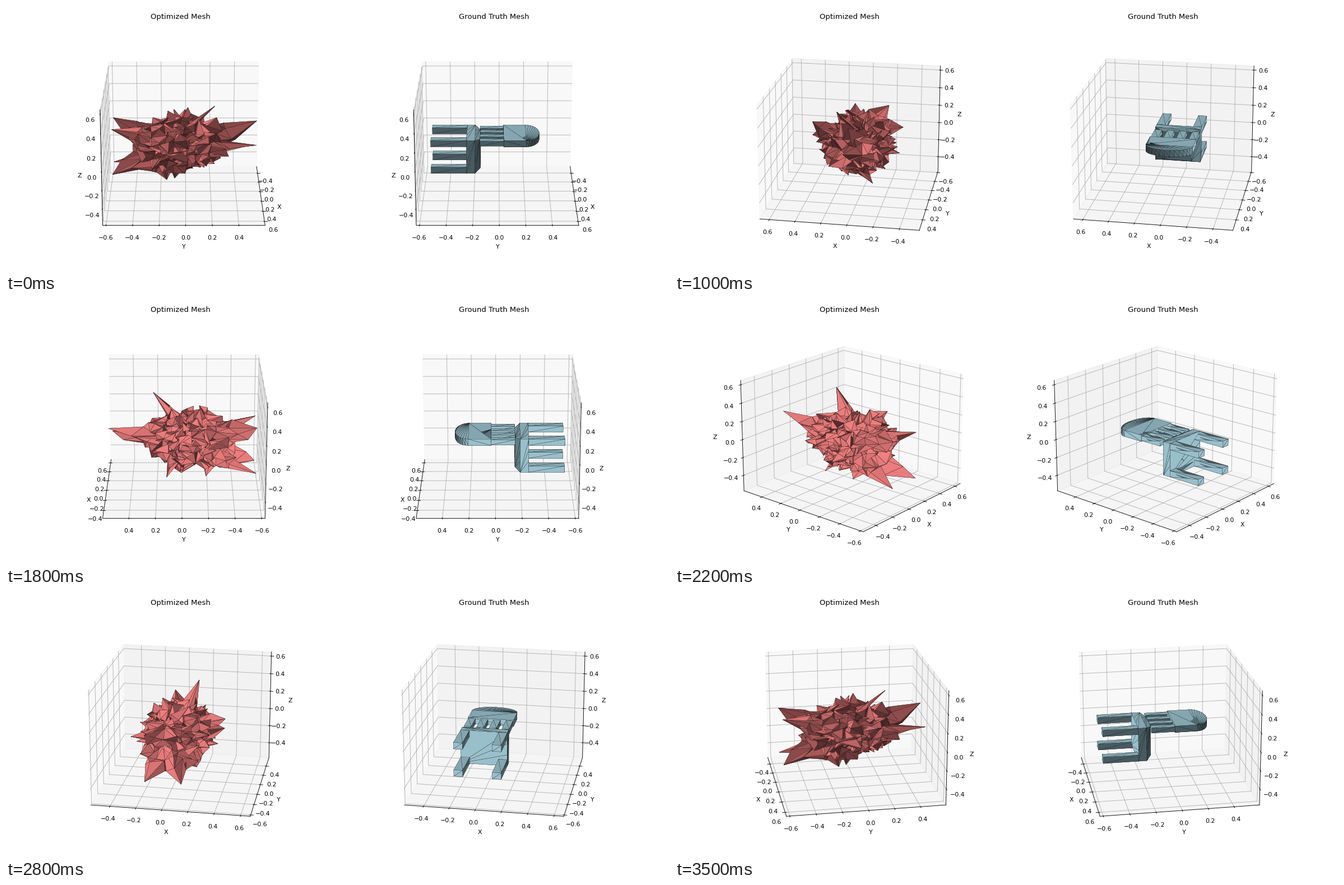
A matplotlib script that plays this animation: 1183x473 px, repeating every 3600 ms.

```python
import numpy as np
import matplotlib.pyplot as plt
from matplotlib.animation import FuncAnimation
from mpl_toolkits.mplot3d.art3d import Poly3DCollection

WIDTH, HEIGHT, DPI = 1183, 473, 78.875
FRAMES, INTERVAL = 36, 100
HALF_RANGE = 0.6115
VIEW_CENTER = (0.062, -0.014, 0.036)
BOX, BOTTOM = 432, 11.8          # square axes, in pixels


# ---- chair ---------------------------------------------------------------

def panel(a, b, c, d, n=2):
    """Quad as a fan from d, with the edge a-b cut into n - 1 parts."""
    ring = [*np.linspace(a, b, n), c]
    return [(d, p, q) for p, q in zip(ring, ring[1:])]


def cap(ring, n):
    if len(ring) == 4:
        return panel(*ring, n=n)
    return [(ring[0], p, q) for p, q in zip(ring[1:], ring[2:])]


def loft(rings, n=2):
    """Closed solid through rings that turn counterclockwise about its axis."""
    tris = cap(rings[0][::-1], n) + cap(rings[-1], n)
    for low, high in zip(rings, rings[1:]):
        for i in range(len(low)):
            j = (i + 1) % len(low)
            tris += panel(low[i], low[j], high[j], high[i], n)
    return tris


def rect(x0, x1, z0, z1, y):
    return np.array([(x0, y, z0), (x0, y, z1), (x1, y, z1), (x1, y, z0)])


def chair():
    side, z_low, z_high = 0.182, -0.275, 0.089
    leg, seat_back, seat_mid, seat_front = 0.068, -0.255, -0.19, -0.15
    rest, shoulder, rise = 0.035, 0.21, 0.105

    tris = loft([rect(-side, side, z_low, z_high, seat_back),
                 rect(-side, side, z_low, z_high, seat_mid),
                 rect(-0.115, 0.115, z_low + 0.025, z_high - 0.02, seat_front)], 4)
    for x in (-side, side - leg):
        for z in (z_low, z_high - leg):
            tris += loft([rect(x, x + leg, z, z + leg, y)
                          for y in (-0.532, seat_back)])
    for x in np.linspace(-0.15, 0.15, 4):
        tris += loft([rect(x - 0.028, x + 0.028, 0.026, 0.08, y)
                      for y in (seat_front, rest)])

    t = np.linspace(0, np.pi, 16)
    xs = np.append(side * np.cos(t), [-side, side])
    ys = np.append(shoulder + rise * np.sin(t), [rest, rest])
    tris += loft([np.column_stack([xs, ys, np.full(len(xs), z)])
                  for z in (z_high - 0.069, z_high)])
    return np.array(tris)


# ---- spiky mesh ----------------------------------------------------------

def icosphere(levels):
    g = (1 + 5 ** 0.5) / 2
    verts = [np.roll((0, a, b * g), k) for k in range(3)
             for a in (-1, 1) for b in (-1, 1)]
    verts = [v / np.linalg.norm(v) for v in verts]
    near = lambda i, j: np.dot(verts[i], verts[j]) > 0.4
    faces = []
    for i in range(12):
        for j in range(i + 1, 12):
            for k in range(j + 1, 12):
                if near(i, j) and near(j, k) and near(i, k):
                    out = np.linalg.det([verts[i], verts[j], verts[k]]) > 0
                    faces.append((i, j, k) if out else (i, k, j))
    for _ in range(levels):
        middle = {}

        def mid(i, j):
            key = min(i, j), max(i, j)
            if key not in middle:
                middle[key] = len(verts)
                m = verts[i] + verts[j]
                verts.append(m / np.linalg.norm(m))
            return middle[key]

        split = []
        for i, j, k in faces:
            a, b, c = mid(i, j), mid(j, k), mid(k, i)
            split += [(i, a, c), (a, j, b), (c, b, k), (a, b, c)]
        faces = split
    return np.array(verts), np.array(faces)


def cone_radius(angle, length, foot, spread):
    """Distance to the straight flank from a tip down to the body."""
    a = np.minimum(angle, spread)
    flank = length * foot * np.sin(spread) / (
        length * np.sin(a) + foot * np.sin(spread - a))
    return np.where(angle < spread, flank, 0)


def spiky_mesh():
    rng = np.random.default_rng(7)
    center = np.array([0.03, -0.04, -0.02])
    dirs, faces = icosphere(3)

    # Four leg tips, two backrest tips, one tall spike and one to the side.
    legs = [(x, -0.575, z) for x in (-0.14, 0.14) for z in (0.19, -0.31)]
    back = [(-0.11, 0.565, 0.17), (0.145, 0.55, 0.02)]
    spikes = [(0.145, 0.225, 0.448), (0.4, -0.09, 0.18)]
    tips = np.array(legs + back + spikes) - center
    spread = np.repeat([1.1, 0.3], [len(legs + back), len(spikes)])
    length = np.linalg.norm(tips, axis=1)
    cosine = np.clip(dirs @ (tips / length[:, None]).T, -1, 1)
    reach = cone_radius(np.arccos(cosine), length, 0.25, spread).max(axis=1)

    body = 1 / np.linalg.norm(dirs / (0.25, 0.3, 0.27), axis=1)
    radius = np.maximum(body, reach) * rng.uniform(0.72, 1.06, len(dirs))
    stray = (rng.random(len(dirs)) < 0.06) & (radius < 0.36)
    radius[stray] *= 1.3
    points = dirs * radius[:, None] + rng.normal(0, 0.032, dirs.shape)
    points[cosine.argmax(axis=0)] = tips
    return (points + center)[faces]


# ---- scene ---------------------------------------------------------------

fig = plt.figure(figsize=((WIDTH + 1e-6) / DPI, (HEIGHT + 1e-6) / DPI), dpi=DPI)


def add_view(center_x, title, tris, color):
    ax = fig.add_axes([(center_x - BOX / 2) / WIDTH, BOTTOM / HEIGHT,
                       BOX / WIDTH, BOX / HEIGHT], projection="3d")
    ax.add_collection3d(Poly3DCollection(
        tris, facecolors=color, edgecolors="black", linewidths=0.2, shade=True))
    for name, mid in zip("xyz", VIEW_CENTER):
        ax.set(**{f"{name}lim": (mid - HALF_RANGE, mid + HALF_RANGE),
                  f"{name}label": name.upper()})
    ax.set_title(title)
    return ax


views = [add_view(311.5, "Optimized Mesh", spiky_mesh(), "lightcoral"),
         add_view(871, "Ground Truth Mesh", chair(), "lightblue")]


def update(frame):
    for ax in views:
        ax.view_init(elev=20, azim=frame * 360 / FRAMES)
    return views


anim = FuncAnimation(fig, update, frames=FRAMES, interval=INTERVAL,
                     init_func=lambda: views, repeat=True, repeat_delay=0)
plt.show()
```
